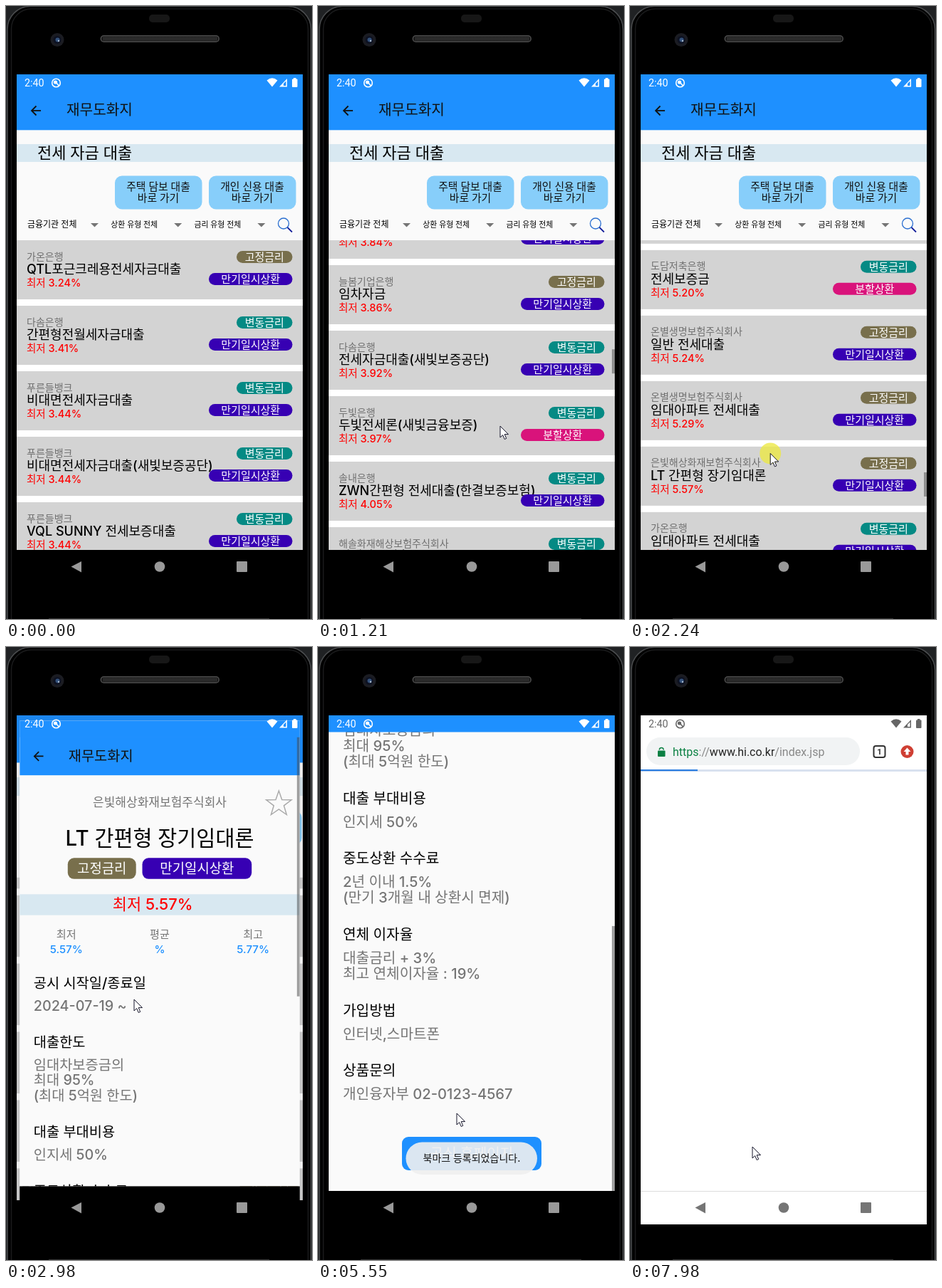
An HTML page with a canvas that plays this animation: 430 px wide and 861 px high, repeating every 8000 ms.

```html
<!DOCTYPE html>
<html lang="ko">
<head>
<meta charset="utf-8">
<style>
html, body { margin: 0; width: 100%; height: 100%; overflow: hidden; background: #000; }
canvas { display: block; }
</style>
</head>
<body>
<canvas id="stage" width="430" height="861"></canvas>
<script>
const c = document.getElementById('stage').getContext('2d');
const BLUE = '#1e90ff', GRAY = '#757575', BAND = '#d8e8f1', PAGE = '#fafafa';
const OLIVE = '#786f4c', TEAL = '#058a84', PURPLE = '#3700b3', PINK = '#d9137b';
const LOOP = 8000, CX = 216, CY = 453.5;

// ---- helpers ----
const fade = (t, a, b) => Math.max(0, Math.min(1, (t - a) / (b - a)));
const smooth = k => k * k * (3 - 2 * k);

// Keys are [time, value, value...].
function at(t, keys, ease = smooth) {
  let i = 0;
  while (i < keys.length - 2 && t >= keys[i + 1][0]) i++;
  const [a, b] = [keys[i], keys[i + 1]], k = ease(fade(t, a[0], b[0]));
  return a.slice(1).map((v, j) => v + (b[j + 1] - v) * k);
}
function rect(x, y, w, h, color) {
  c.fillStyle = color;
  c.fillRect(x, y, w, h);
}
function fill(color) {
  c.fillStyle = color;
  c.fill();
}
function stroke(color, width) {
  c.strokeStyle = color;
  c.lineWidth = width;
  c.stroke();
}
function boxPath(x, y, w, h, r) {
  c.beginPath();
  c.roundRect(x, y, w, h, r);
}
function box(x, y, w, h, r, color) {
  boxPath(x, y, w, h, r);
  fill(color);
}
function arc(x, y, r, from = 0, to = 7) {
  c.beginPath();
  c.arc(x, y, r, from, to);
}
function disc(x, y, r, color) {
  arc(x, y, r);
  fill(color);
}
function line(color, width, ...points) {
  c.beginPath();
  points.forEach(p => c.lineTo(...p));
  stroke(color, width);
}
function poly(color, ...points) {
  c.beginPath();
  points.forEach(p => c.lineTo(...p));
  c.closePath();
  fill(color);
}
// y is the middle of the line.
function text(s, x, y, size, color = '#000', align = 'left', face = 'Inter', weight = 500) {
  c.font = `${weight} ${size}px ${face}, "Noto Sans CJK KR", sans-serif`;
  c.textAlign = align;
  c.fillStyle = color;
  c.fillText(s, x, y + size * 0.36);
}
function pill(s, x, y, w, h, r, size, color) {
  box(x, y, w, h, r, color);
  text(s, x + w / 2, y + h / 2, size, '#fff', 'center');
}
function clipped(x, y, w, h, draw) {
  c.save();
  c.beginPath();
  c.rect(x, y, w, h);
  c.clip();
  draw();
  c.restore();
}
function scaled(s, alpha, draw) {
  c.save();
  c.globalAlpha = alpha;
  c.translate(CX, CY);
  c.scale(s, s);
  c.translate(-CX, -CY);
  draw();
  c.restore();
}

// ---- loan list ----
// bank, title, rate, fixed rate, split repayment
const loans = {
  0: ['가온은행', 'QTL포근크레용전세자금대출', 3.24, 1],
  1: ['다솜은행', '간편형전월세자금대출', 3.41],
  2: ['푸른들뱅크', '비대면전세자금대출', 3.44],
  3: ['푸른들뱅크', '비대면전세자금대출(새빛보증공단)', 3.44],
  4: ['푸른들뱅크', 'VQL SUNNY 전세보증대출', 3.44],
  22: ['늘봄기업은행', '임차자금', 3.86, 1],
  23: ['다솜은행', '전세자금대출(새빛보증공단)', 3.92],
  24: ['두빛은행', '두빛전세론(새빛금융보증)', 3.97, 0, 1],
  25: ['솔내은행', 'ZWN간편형 전세대출(한결보증보험)', 4.05],
  26: ['해솔화재해상보험주식회사', '전세자금대출', 4.09],
  44: ['물결은행', '공공주택임차보증금담보대출', 4.95],
  45: ['윤슬빛저축은행', '전세자금대출', 5.00, 1],
  46: ['도담저축은행', '전세보증금', 5.20, 0, 1],
  47: ['온별생명보험주식회사', '일반 전세대출', 5.24, 1],
  48: ['온별생명보험주식회사', '임대아파트 전세대출', 5.29, 1],
  49: ['은빛해상화재보험주식회사', 'LT 간편형 장기임대론', 5.57, 1]
};
const banks = ['가온은행', '솔내은행', '두빛은행', '물결은행', '다솜은행'];
const titles = ['전세자금대출', '일반 전세대출', '임대아파트 전세대출', '전세보증금'];
const loan = i => loans[i] || [banks[i * 3 % 5], titles[i * 7 % 4], 3.4 + i * i / 1000, i % 4 == 0, i % 5 == 2];

function card(i, y) {
  const [bank, title, rate, fixed, split] = loan(i);
  rect(15, y, 402, 83, '#d3d3d3');
  text(bank, 29, y + 22.5, 14, '#707070', 'left', 'Inter', 400);
  text(title, 29, y + 41, 18);
  text('최저 ' + rate.toFixed(2) + '%', 29, y + 59.5, 14.5, '#f00');
  pill(fixed ? '고정금리' : '변동금리', 324, y + 15, 78.5, 17, 8.5, 15, fixed ? OLIVE : TEAL);
  pill(split ? '분할상환' : '만기일시상환', 285, y + 46, 117.5, 17, 8.5, 15, split ? PINK : PURPLE);
}
function appBar() {
  rect(15, 119, 402, 55.3, BLUE);
  line('#111', 1.8, [49, 147], [36, 147]);
  line('#111', 1.8, [42.5, 140.5], [36, 147], [42.5, 153.5]);
  text('재무도화지', 85, 146, 20.2, '#111');
}
function listPage(t) {
  const [scroll] = at(t, [[120, 0], [1210, 1989], [1630, 4068], [2180, 4190], [2440, 4392]]);
  rect(15, 96, 402, 668, PAGE);
  rect(15, 96, 402, 24, BLUE);
  appBar();
  rect(15, 194, 402, 25, BAND);
  text('전세 자금 대출', 44, 206, 22);
  ['주택 담보 대출', '개인 신용 대출'].forEach((s, i) => {
    const x = 153 + i * 132;
    box(x, 238.5, 122.5, 47, 10, '#87cefa');
    text(s, x + 61, 254, 14.8, '#111', 'center');
    text('바로 가기', x + 61, 270, 14.8, '#111', 'center');
  });
  ['금융기관 전체', '상환 유형 전체', '금리 유형 전체'].forEach((s, i) => {
    const x = 30 + i * 117.2;
    text(s, x, 307, i ? 10.9 : 12);
    poly(GRAY, [x + 89, 305], [x + 100, 305], [x + 94.5, 310.5]);
  });
  arc(390, 305.5, 7.5);
  stroke('#2b6fd0', 1.3);
  line('#16209a', 1.8, [395.5, 311], [402, 317.5]);
  clipped(15, 329, 402, 435, () => {
    rect(15, 329, 402, 435, '#fff');
    const first = Math.floor(scroll / 92);
    for (let i = first; i < first + 6; i++) card(i, 329 + i * 92 - scroll);
    const alpha = 0.45 * fade(t, 120, 200) * (1 - fade(t, 2440, 2640));
    rect(413, 328 + scroll / 12.9, 4, 34, `rgba(60,60,60,${alpha})`);
  });
  rect(15, 764, 402, 47, '#000');
}

// ---- loan details ----
const sections = [
  ['공시 시작일/종료일', '2024-07-19 ~'],
  ['대출한도', '임대차보증금의', '최대 95%', '(최대 5억원 한도)'],
  ['대출 부대비용', '인지세 50%'],
  ['중도상환 수수료', '2년 이내 1.5%', '(만기 3개월 내 상환시 면제)'],
  ['연체 이자율', '대출금리 + 3%', '최고 연체이자율 : 19%'],
  ['가입방법', '인터넷,스마트폰'],
  ['상품문의', '개인융자부 02-0123-4567']
];
function star(on) {
  c.beginPath();
  for (let i = 0; i < 10; i++) {
    const a = i * Math.PI / 5, r = (on ? 15 : 19) * (i % 2 ? 0.4 : 1);
    c.lineTo(387 + r * Math.sin(a), 215.5 - r * Math.cos(a));
  }
  c.closePath();
  if (!on) return stroke('#aaa', 1.5);
  c.lineJoin = 'round';
  stroke('#ffefb0', 6);
  stroke('#ffc545', 3);
  fill('#ffff10');
  c.lineJoin = 'miter';
}
function detailBody(t) {
  appBar();
  text('은빛해상화재보험주식회사', CX, 213, 17.4, GRAY, 'center');
  star(t > 4200);
  text('LT 간편형 장기임대론', CX, 264, 30, '#000', 'center');
  pill('고정금리', 84, 293, 98, 30, 9, 19.3, OLIVE);
  pill('만기일시상환', 191, 293, 157, 30, 9, 19.3, PURPLE);
  rect(15, 345, 402, 30, BAND);
  text('최저 5.57%', 206, 359.5, 22.4, '#f00', 'center');
  [['최저', '5.57%'], ['평균', '%'], ['최고', '5.77%']].forEach(([label, value], i) => {
    text(label, 82 + i * 134, 402, 15.5, GRAY, 'center');
    text(value, 82 + i * 134, 424, 15.5, BLUE, 'center');
  });
  let y = 472;
  for (const [head, ...lines] of sections) {
    text(head, 35, y, 20.2);
    y += 33;
    lines.forEach((s, i) => text(s, 35, y + i * 22, 20.2, GRAY));
    y += lines.length * 22 + 29.7;
  }
  pill('공식 홈페이지', 118, 1161, 196, 47, 9, 20.2, BLUE);
}
function detailPage(t) {
  const scroll = 473 * smooth(fade(t, 4650, 5430));
  rect(15, 96, 402, 668, PAGE);
  clipped(15, 119, 402, 645, () => {
    c.save();
    c.translate(0, -scroll);
    detailBody(t);
    c.restore();
    const alpha = 1 - fade(t, 3600, 3900) + fade(t, 4650, 4750) - fade(t, 5800, 6030);
    rect(413, 119.5 + scroll * 0.576, 4, 372, `rgba(70,70,70,${0.5 * alpha})`);
  });
  rect(15, 96, 402, 23.5, BLUE);
  rect(15, 764, 402, 47, '#000');
}

// ---- browser ----
function browser(t) {
  rect(15, 96, 402, 715, '#fff');
  rect(15, 764, 402, 1, '#dcdcdc');
  if (t < 6500) return;
  box(23, 127, 300, 39, 19.5, '#f1f3f4');
  boxPath(342.5, 139, 16, 16, 3);
  stroke('#333', 2);
  text('1', 350.5, 147, 11.5, '#333', 'center', 'Roboto', 700);
  disc(389.5, 147, 9, '#cf3f33');
  poly('#fff', [389.5, 141.5], [394.5, 147], [384.5, 147]);
  rect(387.5, 146, 4, 5.5, '#fff');
  rect(15, 172, 402, 3, '#d9e1ef');
  if (t < 6950) return;
  box(39, 145.5, 10.5, 8.5, 1, '#0b8043');
  arc(44.2, 144.5, 2.9, Math.PI, 0);
  stroke('#0b8043', 1.5);
  let x = 60;
  [['https', '#0b8043'], ['://', '#888'], ['www.hi.co.kr', '#222'], ['/index.jsp', '#888']].forEach(([s, color]) => {
    text(s, x, 147, 16, color, 'left', 'Roboto', 400);
    x += c.measureText(s).width;
  });
  rect(15, 172, 40 * (fade(t, 7020, 7420) + fade(t, 7500, 7980)), 2.2, '#2b7de0');
}

// ---- device ----
function phone() {
  rect(0, 0, 430, 861, '#202224');
  boxPath(2, 0.5, 426.5, 900, 32);
  fill('#000');
  stroke('#4a4c4e', 1.5);
  boxPath(7.5, 4, 417, 900, 28);
  stroke('#1a1b1c', 1.5);
  rect(60, 860, 310, 1, '#333');
  box(201, 12, 29, 11, 5, '#171717');
  disc(72, 47.5, 9.5, '#1b1c22');
  disc(72, 47.5, 5.5, '#0d1222');
  disc(72.5, 47.5, 3, '#34527c');
  disc(74, 49, 1.2, '#a9bccf');
  box(132.5, 41, 167.5, 10, 5, '#4a4a4a');
  box(134, 42.5, 164.5, 7, 3.5, '#1c1c1c');
  for (let x = 137; x < 297; x += 2) rect(x, 43.5, 1, 5, '#3a3a3a');
}
function statusBar(color) {
  text('2:40', 26, 108, 14.3, color, 'left', 'Roboto', 400);
  arc(70.5, 108, 5.8);
  stroke(color, 1.6);
  disc(69.5, 107, 2.6, color);
  line(color, 1.6, [70, 107], [74.5, 112]);
  c.beginPath();
  c.moveTo(374, 113.5);
  c.lineTo(366.5, 104.5);
  c.quadraticCurveTo(374, 98, 381.5, 104.5);
  fill(color);
  poly(color, [384, 113.5], [395, 113.5], [395, 102]);
  poly(color == '#fff' ? BLUE : '#fff', [390, 112], [393.5, 112], [393.5, 105.5], [390, 109]);
  box(402, 102.5, 7.5, 11.5, 1, color);
  rect(404, 101, 3.5, 2, color);
}
function navBar(color) {
  poly(color, [91.5, 787.5], [106, 780], [106, 795.5]);
  disc(216, 787.5, 7.3, color);
  box(324, 780, 15, 15, 1, color);
}
function toast(t) {
  c.globalAlpha = fade(t, 4440, 4600) - fade(t, 6350, 6500);
  box(123.5, 695.5, 184.5, 45.5, 22.7, 'rgba(240,240,240,.9)');
  text('북마크 등록되었습니다.', CX, 717.5, 14, '#111', 'center');
  c.globalAlpha = 1;
}
const swipes = [150, 1400, 2180, 4690], taps = [2580, 4150, 5960];
const route = [
  [120, 264, 752], [400, 258, 570], [1210, 256, 590], [1400, 236, 690], [1630, 221, 567],
  [2180, 200, 650], [2440, 180, 495], [3000, 180, 495], [3900, 387, 214], [4230, 387, 214],
  [4650, 246, 681], [5000, 222, 470], [5550, 195, 655], [5900, 172, 702]
];
function pointer(t) {
  if (t < 120) return;
  const [x, y] = at(t, route);
  const held = (starts, ms) => starts.some(s => t >= s && t < s + ms);
  if (held(swipes, 280) || held(taps, 70)) disc(x, y, 15, 'rgba(236,232,70,.8)');
  c.save();
  c.translate(x, y);
  poly('#fff', [0, 0], [0, 16], [3.7, 12.6], [6.2, 18.5], [8.7, 17.4], [6.2, 11.6], [11.5, 11.6]);
  stroke('#15152a', 1);
  c.restore();
}

// A new window grows into place while the one behind it swells and dims.
function openWindow(t, start, behind, front) {
  const p = fade(t, start, start + 260), u = 1 - (1 - p) ** 3;
  if (p < 1) scaled(1 + 0.05 * u, 1, () => behind(t));
  rect(15, 96, 402, 715, `rgba(0,0,0,${0.08 * u})`);
  scaled(1 - 0.1375 * (1 - u), Math.min(1, p * 4), () => front(t));
}

function draw(now) {
  const t = now % LOOP, web = t >= 6180;
  phone();
  clipped(15, 96, 402, 715, () => {
    if (t < 2900) listPage(t);
    else if (t < 6170) openWindow(t, 2860, listPage, detailPage);
    else openWindow(t, 6130, detailPage, browser);
  });
  statusBar(web ? '#666' : '#fff');
  navBar(web ? '#757575' : '#999');
  toast(t);
  pointer(t);
  requestAnimationFrame(draw);
}
requestAnimationFrame(draw);
</script>
</body>
</html>
```
